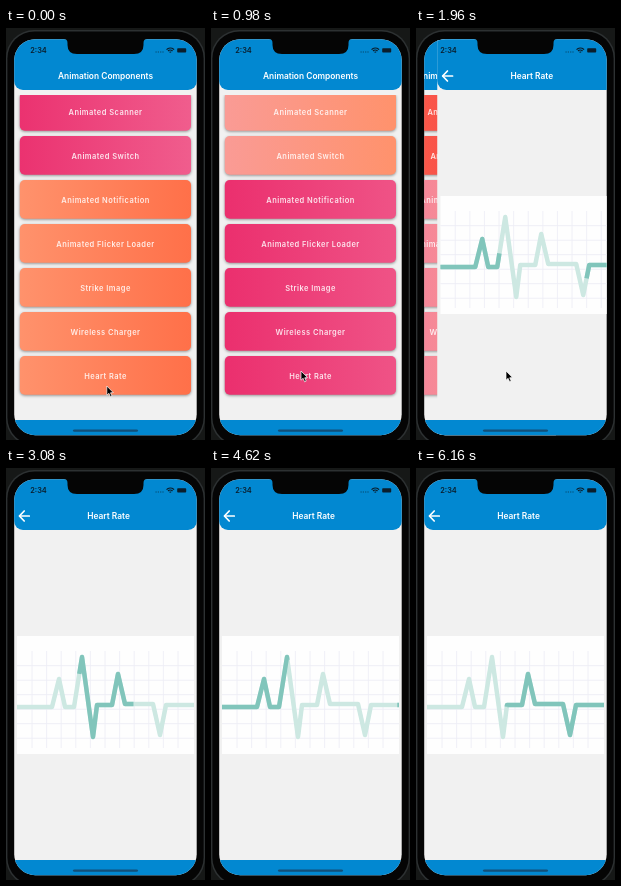
Write an HTML page with a canvas that moves like this. It is 199 px wide and 412 px high and loops after 6.3 s.

```html
<!DOCTYPE html>
<html lang="en">
<head>
<meta charset="utf-8">
<title>Animation Components</title>
<style>
html, body { margin: 0; width: 100%; height: 100%; overflow: hidden; background: #0c0c0c; }
canvas { display: block; width: 199px; height: 412px; }
</style>
</head>
<body>
<canvas id="stage"></canvas>
<script>
const W = 199, H = 412, LOOP = 6300, STEP = 140;
const canvas = document.getElementById('stage');
const ctx = canvas.getContext('2d');
const dpr = window.devicePixelRatio || 1;
canvas.width = W * dpr;
canvas.height = H * dpr;

const BLUE = '#0288d1', PAGE = '#f1f1f1', INK = '#0b1e2c';
const FONT = 'Inter, "Liberation Sans", sans-serif';
const LABELS = ['Animated Scanner', 'Animated Switch', 'Animated Notification',
  'Animated Flicker Loader', 'Strike Image', 'Wireless Charger', 'Heart Rate'];

// Cyclic palette; each button end travels along it
const PALETTE = [[255, 160, 122], [255, 104, 64], [233, 30, 99], [240, 96, 143], [244, 149, 176]];
const TIMES = [0, 420, 980, 1540];
const PHASES = {
  lead: { left: [2.3, 3.15, 4.5, 5.4], right: [2.95, 4, 5.25, 6.05] },
  rest: { left: [0.25, 1, 2.25, 3], right: [0.85, 2, 2.8, 4] }
};

const PULSE = [[11, 239], [46, 239], [53, 211], [59, 239], [68, 239], [76, 189], [87, 269],
  [91, 237], [106, 237], [112, 206], [119, 236], [147, 236], [154, 267], [160, 237], [189, 237]];
const DASH = 216, PERIOD = 520, SPEED = 0.2105;
const PUSH_START = 1680, PUSH_TIME = 480;

const clamp = x => Math.max(0, Math.min(1, x));
const ease = x => 1 - Math.pow(1 - clamp(x), 3);

function keyed(values, t) {
  let i = 0;
  while (i < TIMES.length - 2 && t > TIMES[i + 1]) i++;
  const k = (t - TIMES[i]) / (TIMES[i + 1] - TIMES[i]);
  return values[i] + (values[i + 1] - values[i]) * k;
}

function paletteAt(phase) {
  const i = Math.floor(phase), k = phase - i;
  const a = PALETTE[i % 5], b = PALETTE[(i + 1) % 5];
  return `rgb(${a.map((v, n) => Math.round(v + (b[n] - v) * k)).join(',')})`;
}

function box(x, y, w, h, r, fill) {
  ctx.beginPath();
  ctx.roundRect(x, y, w, h, r);
  ctx.fillStyle = fill;
  ctx.fill();
}

function polyline(points, color, width) {
  ctx.beginPath();
  points.forEach(([x, y]) => ctx.lineTo(x, y));
  ctx.strokeStyle = color;
  ctx.lineWidth = width;
  ctx.stroke();
}

function text(str, x, y, size, color, spacing = 0) {
  ctx.font = `600 ${size}px ${FONT}`;
  ctx.letterSpacing = spacing + 'px';
  ctx.textAlign = 'center';
  ctx.textBaseline = 'alphabetic';
  ctx.fillStyle = color;
  ctx.fillText(str, x, y);
}

function page(title, x) {
  ctx.fillStyle = PAGE;
  ctx.fillRect(8, 11, 183, 400);
  box(8, 5, 183, 57, 9, BLUE);
  text(title, x, 51, 8.4, '#fff');
}

function button(label, row, t) {
  const y = 64 + row * 44;
  const phase = row < 2 ? PHASES.lead : PHASES.rest;
  const fill = ctx.createLinearGradient(14, 0, 185, 0);
  fill.addColorStop(0, paletteAt(keyed(phase.left, t)));
  fill.addColorStop(1, paletteAt(keyed(phase.right, t)));
  ctx.save();
  if (row === 6 && t > 1500) {
    ctx.globalAlpha = t < 1700 ? Math.max(0.4, 1 - (t - 1500) / 250) : clamp(0.4 + (t - 1700) / 250);
  }
  ctx.save();
  ctx.shadowColor = 'rgba(0,0,0,0.4)';
  ctx.shadowBlur = 3 * dpr;
  ctx.shadowOffsetY = dpr;
  box(13.8, y, 171.2, 38.8, 5, fill);
  ctx.restore();
  text(label, 99.5, y + 22.6, 7.5, 'rgba(255,255,255,0.85)', 0.45);
  ctx.restore();
}

function listPage(t) {
  page('Animation Components', 99.5);
  ctx.save();
  ctx.beginPath();
  ctx.rect(8, 67, 183, 325);
  ctx.clip();
  LABELS.forEach((label, row) => button(label, row, t));
  ctx.restore();
}

function heartPage(t) {
  page('Heart Rate', 102.5);
  ctx.lineCap = ctx.lineJoin = 'round';
  polyline([[18.2, 43], [13.4, 48], [18.2, 53]], '#fff', 1.7);
  polyline([[13.8, 48], [23.3, 48]], '#fff', 1.7);

  ctx.save();
  ctx.beginPath();
  ctx.rect(11, 168, 177, 118);
  ctx.clip();
  ctx.fillStyle = '#fefefe';
  ctx.fillRect(11, 168, 177, 118);
  ctx.lineCap = 'butt';
  for (let i = 0; i < 11; i++) {
    const x = 26 + i * 14.6;
    polyline([[x, 183], [x, 280]], '#efeff6', 0.9);
  }
  for (let i = 0; i < 6; i++) {
    const y = 197.7 + i * 14.5;
    polyline([[11, y], [188, y]], '#efeff6', 0.9);
  }
  polyline(PULSE, '#cde8e2', 4.5);
  const start = (135 + SPEED * (t - 3080) + PERIOD) % PERIOD;
  ctx.setLineDash([DASH, PERIOD - DASH]);
  ctx.lineDashOffset = -start;
  polyline(PULSE, '#81c5bb', 4.5);
  ctx.restore();
}

function statusBar() {
  text('2:34', 32.5, 25.4, 7.4, INK);
  ctx.fillStyle = 'rgba(11,30,44,0.5)';
  for (let i = 0; i < 4; i++) ctx.fillRect(149.5 + i * 2.3, 23.4, 1.2, 1.2);
  ctx.lineCap = 'butt';
  ctx.strokeStyle = INK;
  ctx.lineWidth = 1.2;
  for (const r of [1, 3, 5]) {
    ctx.beginPath();
    ctx.arc(164.3, 25, r, -Math.PI * 0.77, -Math.PI * 0.23);
    ctx.stroke();
  }
  box(171.2, 20.2, 9, 4.4, 0.8, INK);
}

function cursor(t) {
  const k = ease(t / 420);
  ctx.save();
  ctx.translate(100.8 - 10.8 * k, 358 - 15 * k);
  ctx.beginPath();
  [[0, 0], [0, 9.2], [2.1, 7.3], [3.6, 10.8], [5.2, 10.1], [3.7, 6.8], [6.5, 6.6]]
    .forEach(([x, y]) => ctx.lineTo(x, y));
  ctx.closePath();
  ctx.fillStyle = '#000';
  ctx.fill();
  ctx.strokeStyle = '#fff';
  ctx.lineWidth = 0.7;
  ctx.stroke();
  ctx.restore();
}

function notch() {
  ctx.beginPath();
  ctx.moveTo(58, 10);
  ctx.lineTo(58, 11);
  ctx.quadraticCurveTo(61.5, 11, 61.5, 15);
  ctx.lineTo(61.5, 17);
  ctx.quadraticCurveTo(61.5, 26, 71, 26);
  ctx.lineTo(128, 26);
  ctx.quadraticCurveTo(137.5, 26, 137.5, 17);
  ctx.lineTo(137.5, 15);
  ctx.quadraticCurveTo(137.5, 11, 141, 11);
  ctx.lineTo(141, 10);
  ctx.fillStyle = '#050505';
  ctx.fill();
}

function draw(t) {
  ctx.setTransform(dpr, 0, 0, dpr, 0, 0);
  ctx.fillStyle = '#161817';
  ctx.fillRect(0, 0, W, H);
  box(0, 2, 199, 416, 28, '#2d3132');
  box(1.4, 3.4, 196.2, 413.2, 27, '#050505');

  ctx.save();
  ctx.beginPath();
  ctx.roundRect(8.2, 11.2, 182.5, 396, 21);
  ctx.clip();
  const push = ease((t - PUSH_START) / PUSH_TIME);
  if (push < 1) {
    ctx.save();
    ctx.translate(-55 * push, 0);
    listPage(t);
    ctx.restore();
  }
  if (push > 0) {
    ctx.save();
    ctx.translate(183 * (1 - push), 0);
    heartPage(t);
    ctx.restore();
  }
  ctx.fillStyle = BLUE;
  ctx.fillRect(8, 392, 183, 20);
  box(67, 401.4, 65, 2.4, 1.2, '#12507a');
  statusBar();
  ctx.restore();

  notch();
  if (t < 2240) cursor(t);
}

function frame(now) {
  draw(Math.floor((now % LOOP) / STEP) * STEP);
  requestAnimationFrame(frame);
}
requestAnimationFrame(frame);
</script>
</body>
</html>
```
